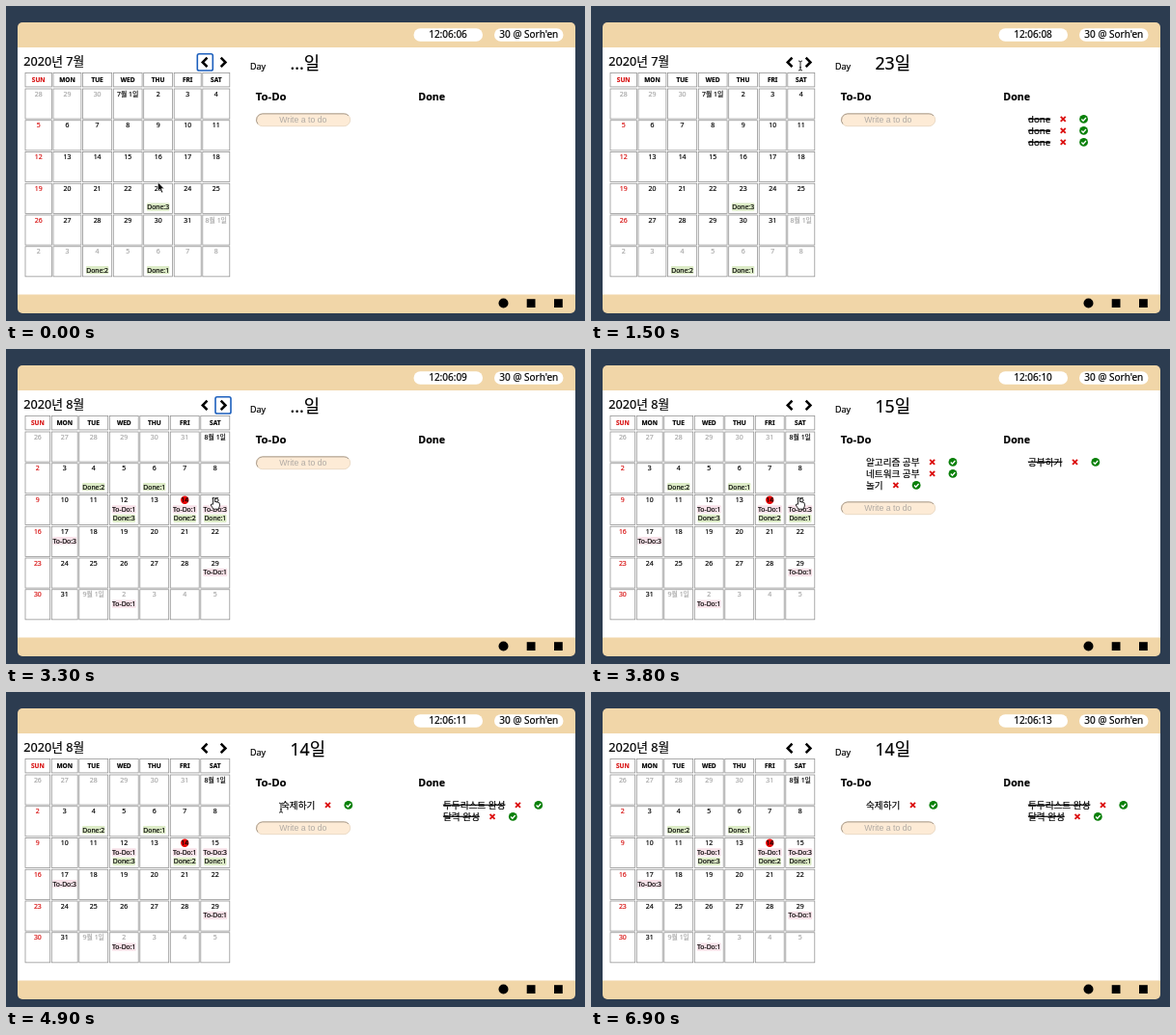
An HTML page for the animation above (7 s loop, 600 px wide and 327 px high).

```html
<!DOCTYPE html>
<html lang="ko">
<head>
<meta charset="utf-8">
<title>Calendar to-do</title>
<style>
  html, body { margin: 0; width: 100%; height: 100%; overflow: hidden; background: #2c3c50; }
  svg { display: block; width: 100vw; height: 100vh; }
  text {
    font-family: 'Noto Sans', 'Noto Sans CJK KR', 'Noto Sans CJK', sans-serif;
    color: #000; fill: currentColor; stroke: currentColor; stroke-width: .18; white-space: pre;
  }
  .mid { text-anchor: middle; }
  .bold { font-weight: 700; }
  .pill { font-size: 10px; }
  .head { font-size: 6.5px; font-weight: 700; }
  .num { font-size: 6.9px; }
  .chip { font-size: 6.8px; }
  .item { font-size: 9.6px; }
  .done { text-decoration: line-through; }
  .hint { font: 8.7px 'Liberation Sans', Arial, sans-serif; color: #b0aaa4; stroke: none; }
  .red { color: #d81414; }
  .out { color: #a8a8a8; }
  .box { fill: #fff; stroke: #8f8f8f; stroke-width: .75; }
  .view { visibility: hidden; }
  .view.on { visibility: visible; }
</style>
</head>
<body>
<svg id="stage" viewBox="0 0 600 327" preserveAspectRatio="none"></svg>
<script>
const LOOP = 7000, STEP = 100;
const stage = document.getElementById('stage');

const text = (x, y, s, cls = '', size = '') =>
  `<text x="${x}" y="${y}" class="${cls}"${size && ` style="font-size:${size}px"`}>${s}</text>`;
const rect = (x, y, w, h, rest) =>
  `<rect x="${x}" y="${y}" width="${w}" height="${h}" ${rest}/>`;
const view = (id, body) => `<g class="view" id="${id}">${body}</g>`;

// Calendar
const WEEK = ['SUN', 'MON', 'TUE', 'WED', 'THU', 'FRI', 'SAT'];
const MONTHS = [
  { month: 7, lead: 3, prev: 30, cols: [19.5, 48.5, 79, 110.8, 142.2, 173.7, 203.3, 232.9],
    todo: {}, done: { 25: 3, 37: 2, 39: 1 } },
  { month: 8, lead: 6, prev: 31, today: 19, cols: [19.5, 46.8, 75.3, 106.8, 138.3, 169.8, 201.3, 232.9],
    todo: { 17: 1, 19: 1, 20: 3, 22: 3, 34: 1, 38: 1 },
    done: { 9: 2, 11: 1, 17: 3, 19: 2, 20: 1 } }
];

function chip(cx, cy, label, n, color, w) {
  return n ? rect(cx - w / 2, cy - 4.2, w, 8.2, `rx="1" fill="${color}"`) +
    text(cx, cy + 2.4, `${label}:${n}`, 'chip mid') : '';
}

function dayLabel(m, i) {
  const d = i - m.lead + 1;
  if (d < 1) return m.prev + d;
  const n = d > 31 ? d - 31 : d;
  return n === 1 ? `${m.month + (d > 31)}월 1일` : n;
}

function calendar(m) {
  const left = c => m.cols[c] + .5;
  const width = c => m.cols[c + 1] - m.cols[c] - 1.6;
  let out = text(18.3, 62.3, `2020년 ${m.month}월`, '', 12.7);
  WEEK.forEach((name, c) => {
    out += rect(left(c), 69.5, width(c), 14.4, 'class="box"') +
      text(left(c) + width(c) / 2, 78.8, name, 'head mid' + (c ? '' : ' red'));
  });
  for (let i = 0; i < 42; i++) {
    const c = i % 7, y = 86 + 32.75 * Math.floor(i / 7), cx = left(c) + width(c) / 2;
    const outside = i < m.lead || i >= m.lead + 31;
    const tone = outside ? ' out' : c ? '' : ' red';
    out += rect(left(c), y, width(c), 31.1, 'class="box"');
    if (i === m.today) out += `<circle cx="${cx}" cy="${y + 5.2}" r="4.2" fill="#e60000"/>`;
    out += text(cx, y + 7.5, dayLabel(m, i), 'num mid' + tone) +
      chip(cx, y + 14.9, 'To-Do', m.todo[i], '#f7e1e8', 25) +
      chip(cx, y + 24.5, 'Done', m.done[i], '#dcebc6', 23.4);
  }
  return view('month' + m.month, out);
}

// Day panel
const DAYS = {
  '...': { todo: [], done: [] },
  23: { todo: [], done: ['done', 'done', 'done'] },
  15: { todo: ['알고리즘 공부', '네트워크 공부', '놀기'], done: ['공부하기'] },
  14: { todo: ['숙제하기'], done: ['투두리스트 완성', '달력 완성'] }
};
const ICONS = `<path d="M-2.5-2.5 2.5 2.5M2.5-2.5-2.5 2.5" stroke="#dc1010" stroke-width="1.9"/>
  <circle cx="21.3" r="4.4" fill="#0a800a"/>
  <path d="M19.1.1 20.8 1.8 23.7-1.4" fill="none" stroke="#fff" stroke-width="1.3"/>`;

const items = (list, x, cls) => list.map((s, i) =>
  `<g class="row">${text(x, 120.7 + 12 * i, s, 'item ' + cls)}<g>${ICONS}</g></g>`).join('');

function input(y) {
  return rect(259.3, y, 97.4, 13, 'rx="6.5" fill="#fdebd6" stroke="#e6d5be" stroke-width=".8"') +
    `<path d="M261 ${y + 10.8}A6.5 6.5 0 0 1 265.8 ${y + .2}H350.2A6.5 6.5 0 0 1 355 ${y + 2.2}"
      fill="none" stroke="#a3978a" stroke-width=".9"/>` +
    text(307.8, y + 9.6, 'Write a to do', 'hint mid');
}

function dayPanel([id, { todo, done }]) {
  const shift = todo.length ? 11 + 12 * todo.length : 0;
  return view('day' + id, text(294.5, 65.8, id + '일', '', 17.7) +
    items(todo, 285, '') + items(done, 453, 'done') + input(111.7 + shift));
}

// Pointers, with the hot spot at 0,0
const beam = (color, width) =>
  `<path d="M-2-5Q0-5 0-3.6V3.6Q0 5-2 5M2-5Q0-5 0-3.6M0 3.6Q0 5 2 5M-1 1.8H1"
    fill="none" stroke="${color}" stroke-width="${width}"/>`;
const POINTERS = {
  arrow: '<path d="M0 0V9.6L2.2 7.6 3.8 11.3 5.4 10.6 3.8 7H6.8Z" fill="#000" stroke="#fff" stroke-width=".7"/>',
  beam: beam('#fff', 2) + beam('#222', 1),
  hand: `<path d="M-1 7V.7Q0-.7 1 .7V4.6Q2 3.8 2.7 4.9 3.7 4.2 4.3 5.4 5.8 5 5.8 6.5V8.8L4.6 12H-.6L-3.4 7.8Q-3.2 6.1-1 7Z"
    fill="#fff" stroke="#111" stroke-width=".9" stroke-linejoin="round"/>`
};

const chevron = (x, dir) =>
  `<path d="M${x - 2.3 * dir} 53.6 ${x + 2.4 * dir} 58.4 ${x - 2.3 * dir} 63.2" fill="none" stroke="#000" stroke-width="2.6"/>`;
const ring = (id, x) =>
  view(id, rect(x, 49.8, 16, 17.2, 'rx="1.8" fill="none" stroke="#1c5fbd" stroke-width="1.6"'));

stage.innerHTML =
  rect(0, 0, 600, 327, 'fill="#2c3c50"') +
  rect(12, 17, 578, 302, 'rx="5" fill="#f1d6a8"') +
  rect(12, 43, 578, 256.5, 'fill="#fff"') +
  rect(422.5, 23.3, 71.5, 13.4, 'rx="6.7" fill="#fff"') +
  rect(506, 23.3, 71.5, 13.4, 'rx="6.7" fill="#fff"') +
  '<text id="clock" x="458" y="33.2" class="pill mid"></text>' +
  text(541.8, 33.2, "30 @ Sorh'en", 'pill mid') +
  MONTHS.map(calendar).join('') +
  ring('prev', 198.3) + ring('next', 217) +
  chevron(206.2, -1) + chevron(225, 1) +
  text(253, 66, 'Day', '', 9) +
  text(258.8, 97.6, 'To-Do', 'bold', 11.3) +
  text(427.3, 97.6, 'Done', 'bold', 10.6) +
  Object.entries(DAYS).map(dayPanel).join('') +
  '<circle cx="515.5" cy="308.5" r="5"/>' +
  rect(539.7, 304.2, 8.8, 8.8, '') + rect(568, 304.2, 8.8, 8.8, '') +
  `<g id="pointer">${Object.entries(POINTERS).map(p => view(...p)).join('')}</g>`;

const views = stage.querySelectorAll('.view');
const pointer = document.getElementById('pointer');
const clock = document.getElementById('clock');

// Icons follow the end of each label
for (const row of stage.querySelectorAll('.row')) {
  const [label, icons] = row.children;
  const x = +label.getAttribute('x') + label.getComputedTextLength() + 13.2;
  icons.setAttribute('transform', `translate(${x} ${label.getAttribute('y') - 3.3})`);
}

// Timeline: time, visible views
const SCENES = [
  [0, 'month7', 'day...', 'prev'],
  [500, 'month7', 'day23'],
  [2000, 'month8', 'day...', 'next'],
  [3500, 'month8', 'day15'],
  [4800, 'month8', 'day14']
];
// Pointer: time, x, y, shape
const PATH = [
  [0, 157.3, 182.7, 'arrow'], [200, 157.5, 187, 'hand'], [700, 157.5, 187, 'hand'],
  [900, 172, 160, 'arrow'], [1500, 217, 62, 'beam'], [1700, 225, 58, 'hand'],
  [2200, 225, 58, 'hand'], [2300, 225, 80, 'arrow'], [2600, 223.7, 144.7, 'arrow'],
  [3000, 215.6, 154.2, 'hand'], [3900, 215.6, 154.2, 'hand'], [4200, 186, 156, 'hand'],
  [4400, 186, 156, 'hand'], [4500, 219, 144, 'arrow'], [4700, 285, 120, 'beam'],
  [5300, 285, 120.5, '']
];
const at = (list, t) => list.findLastIndex(row => row[0] <= t);

function draw(t) {
  const i = at(PATH, t), [t0, x0, y0, shape] = PATH[i];
  const [t1, x1, y1] = PATH[i + 1] || [LOOP, x0, y0];
  const k = (t - t0) / (t1 - t0);
  pointer.setAttribute('transform', `translate(${x0 + (x1 - x0) * k} ${y0 + (y1 - y0) * k})`);

  const shown = [...SCENES[at(SCENES, t)].slice(1), shape];
  for (const v of views) v.classList.toggle('on', shown.includes(v.id));

  const seconds = 6 + Math.floor((t + 600) / 1000);
  clock.textContent = '12:06:' + String(seconds).padStart(2, '0');
}

function tick() {
  draw(Math.floor(performance.now() % LOOP / STEP) * STEP);
  requestAnimationFrame(tick);
}
tick();
</script>
</body>
</html>
```
